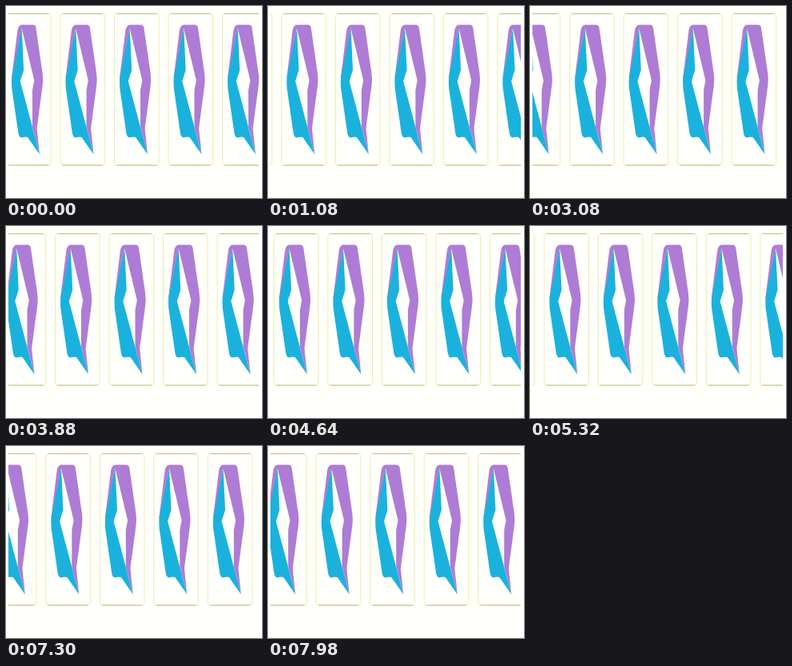
An HTML page that plays this animation: 320 by 240 pixels, repeating every 8000 ms.

```html
<!DOCTYPE html>
<html lang="en">
<head>
<meta charset="utf-8">
<title>Card strip</title>
<style>
  html, body { margin: 0; width: 100%; height: 100%; overflow: hidden; background: #fffffb; }
  svg { display: block; width: 100vw; height: 100vh; }
</style>
</head>
<body>
<svg viewBox="0 0 320 240">
  <defs>
    <clipPath id="view"><rect x="3" width="313" height="240"/></clipPath>
    <g id="card">
      <rect x=".2" y="9.7" width="55.6" height="189.4" rx="3.5" fill="none" stroke="#ececae"/>
      <path d="M3 9.7H53M3 199.1H53" stroke="#bcbc8e"/>
      <g transform="translate(-.3 0)">
        <path fill="#ae7cd4" d="M20 23.5H33.5Q36.7 23.5 37.4 27L45.6 84Q46.8 92 45.6 100L38.6 153L42 185.5L33 151L33 105L35.3 93L19.7 28L8 93L7 90L14.3 31Q15.5 23.5 20 23.5Z"/>
        <path fill="#1ab2dc" d="M19.7 28L22.2 80L17.8 94L42 185.5L27 164Q25.5 163.4 23 163.8L19.5 164.4Q16.2 164.2 15.4 159L7.3 103Q6.5 95 7.5 88Z"/>
      </g>
    </g>
  </defs>
  <g clip-path="url(#view)"><g id="strip"></g></g>
</svg>
<script>
  const LOOP = 8000, PITCH = 67.5, STEP = 0.744, START = 0.3;
  const BEAT = 140, HITCH = 4340;
  const strip = document.getElementById('strip');

  for (let i = -1; i < 5; i++) {
    const card = document.createElementNS('http://www.w3.org/2000/svg', 'use');
    card.setAttribute('href', '#card');
    card.setAttribute('x', i * PITCH);
    strip.append(card);
  }

  // Three equal steps per beat: one long hold, then two short ones.
  function stepsAt(t) {
    const extra = t >= HITCH ? 1 : 0;
    const u = t - extra * 20;
    const phase = u % BEAT;
    return Math.floor(u / BEAT) * 3 + (phase >= 100) + (phase >= 120) + extra;
  }

  function draw(t) {
    const x = (START + stepsAt(t) * STEP) % PITCH;
    strip.setAttribute('transform', `translate(${x.toFixed(3)} 0)`);
  }

  const begin = performance.now();
  function tick() {
    draw((performance.now() - begin) % LOOP);
    requestAnimationFrame(tick);
  }
  tick();
</script>
</body>
</html>
```
